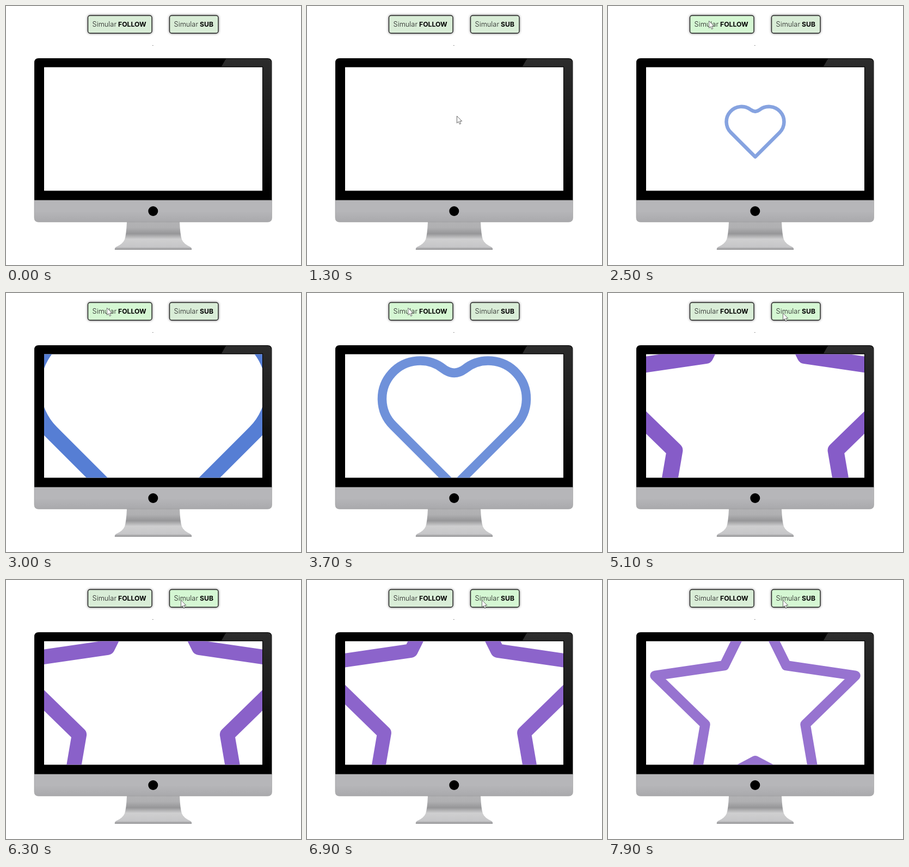
An HTML page for the animation above (8 s loop, 542 by 476 pixels).

```html
<!DOCTYPE html>
<html lang="pt">
<head>
<meta charset="utf-8">
<style>
html, body { margin: 0; width: 100%; height: 100%; overflow: hidden; background: #fff; }
svg { display: block; }
text { font: 300 12.8px Inter, sans-serif; fill: #222; }
.strong { font-weight: 700; font-size: 12.2px; fill: #000; }
.button { fill: #d9edd7; stroke: #222; stroke-width: 1.4; filter: drop-shadow(0 0 2px #0008); }
.button.hover { fill: #d5f7d3; }
#icon path { fill: none; stroke-linecap: round; stroke-linejoin: round; }
</style>
</head>
<body>
<svg width="542" height="476" viewBox="0 0 542 476">
  <defs>
    <linearGradient id="chin" x2="0" y2="1">
      <stop stop-color="#b6b6b9"/><stop offset=".5" stop-color="#b6b6b9"/><stop offset="1" stop-color="#a9a9ac"/>
    </linearGradient>
    <linearGradient id="stand" x2="0" y2="1">
      <stop stop-color="#b2b2b4"/><stop offset=".2" stop-color="#b0b0b2"/><stop offset=".42" stop-color="#969698"/>
      <stop offset=".62" stop-color="#cfcfd0"/><stop offset=".9" stop-color="#c6c6c8"/><stop offset="1" stop-color="#8f8f91"/>
    </linearGradient>
    <linearGradient id="glare" x2="0" y2="1">
      <stop stop-color="#2c2c2c"/><stop offset=".5" stop-color="#191919"/><stop offset="1" stop-color="#000"/>
    </linearGradient>
    <clipPath id="screen"><rect x="70" y="112.5" width="401" height="227"/></clipPath>
  </defs>

  <rect id="follow" class="button" x="150.5" y="17.5" width="117.5" height="32.5" rx="4"/>
  <text x="158.6" y="38">Simular</text><text class="strong" x="206" y="38">FOLLOW</text>
  <rect id="sub" class="button" x="300.5" y="17.5" width="89.5" height="32.5" rx="4"/>
  <text x="308.6" y="38">Simular</text><text class="strong" x="356" y="38">SUB</text>
  <rect x="269" y="72" width="1.5" height="1" fill="#777"/>

  <path fill="url(#stand)" d="M222 397H319Q320 420 323 429Q326 437 339 443Q342 445 341 448H200Q199 445 202 443Q215 437 218 429Q221 420 222 397Z"/>
  <path fill="#000" d="M52 358V104Q52 96 60 96H480.5Q488.5 96 488.5 104V358Z"/>
  <path fill="url(#glare)" d="M404 97H480Q488 97 488 105V345H472V111H396Z"/>
  <path fill="url(#chin)" stroke="#999" stroke-width=".6" d="M52 357H488.5V389Q488.5 397 480.5 397H60Q52 397 52 389Z"/>
  <circle cx="270.3" cy="377" r="9" fill="#000"/>
  <rect x="70" y="112.5" width="401" height="227" fill="#fff"/>
  <g clip-path="url(#screen)">
    <g id="icon">
      <path id="heart" stroke="#567ed4" stroke-width="1.3" d="M0 9.23L-8.84 .39A5.5 5.5 0 0 1 -1.5 -7.78Q0 -6.7 1.5 -7.78A5.5 5.5 0 0 1 8.84 .39Z"/>
      <path id="star" stroke="#865cc8" d="M0-10L3.09-3.74 10-2.73 5 2.14 6.18 9.02 0 5.77-6.18 9.02-5 2.14-10-2.73-3.09-3.74Z"/>
    </g>
  </g>
  <path id="cursor" fill="#fff" stroke="#555" stroke-width=".9" d="M0 0V13L3 10.3 5 15 7.2 14 5.2 9.5H9.3Z"/>
</svg>
<script>
const $ = id => document.getElementById(id);
const LOOP = 8000, HEART_AT = 2465, STAR_AT = 4500;

// Rows are [time, value, value, ...]; values run linearly between rows.
function track(rows, t) {
  let i = 1;
  while (i < rows.length - 1 && t > rows[i][0]) i++;
  const a = rows[i - 1], b = rows[i];
  const k = Math.min(1, Math.max(0, (t - a[0]) / (b[0] - a[0])));
  return a.slice(1).map((v, n) => v + (b[n + 1] - v) * k);
}

const cursorPath = [
  [100, 545, 400], [1000, 333, 300], [1800, 180, 40], [2000, 185.5, 27.5],
  [3700, 185.5, 27.5], [4250, 321.5, 37]
];
// Phase counts half beats: even to odd grows, odd to even shrinks.
const heartBeat = [[HEART_AT, 0], [3000, 0.99], [STAR_AT, 3.78]];
const starBeat = [[STAR_AT, 0], [4600, 0.183], [5100, 1.17], [6900, 4.517], [7900, 6.3], [8000, 6.485]];

// The CSS "ease" curve, cubic-bezier(.25, .1, .25, 1).
function ease(x) {
  let lo = 0, hi = 1;
  for (let i = 0; i < 24; i++) {
    const u = (lo + hi) / 2;
    if (0.75 * u * (1 - u) + u ** 3 < x) lo = u; else hi = u;
  }
  return 0.3 * lo * (1 - lo) ** 2 + 3 * lo * lo * (1 - lo) + lo ** 3;
}

function show(id, visible) {
  $(id).style.display = visible ? '' : 'none';
}

function draw(t) {
  const isStar = t >= STAR_AT, isHeart = t >= HEART_AT && !isStar;
  show('heart', isHeart);
  show('star', isStar);
  if (isHeart || isStar) {
    const phase = track(isStar ? starBeat : heartBeat, t)[0] % 2;
    const p = ease(phase < 1 ? phase : 2 - phase);
    const size = 6 + 24 * p;
    const scale = isStar ? size : size * 0.704;
    const y = isStar ? 226 : 225 + 1.08 * scale;
    $('icon').setAttribute('transform', `translate(270.5 ${y}) scale(${scale})`);
    $('icon').setAttribute('opacity', 0.7 + 0.3 * p);
  }

  const [x, y] = track(cursorPath, t);
  show('cursor', t >= 100);
  $('cursor').setAttribute('transform', `translate(${x} ${y})`);
  const inRow = y > 17 && y < 50;
  $('follow').classList.toggle('hover', inRow && x > 150 && x < 268);
  $('sub').classList.toggle('hover', inRow && x > 300 && x < 390);
}

const start = performance.now();
function tick() {
  draw((performance.now() - start) % LOOP);
  requestAnimationFrame(tick);
}
tick();
</script>
</body>
</html>
```
